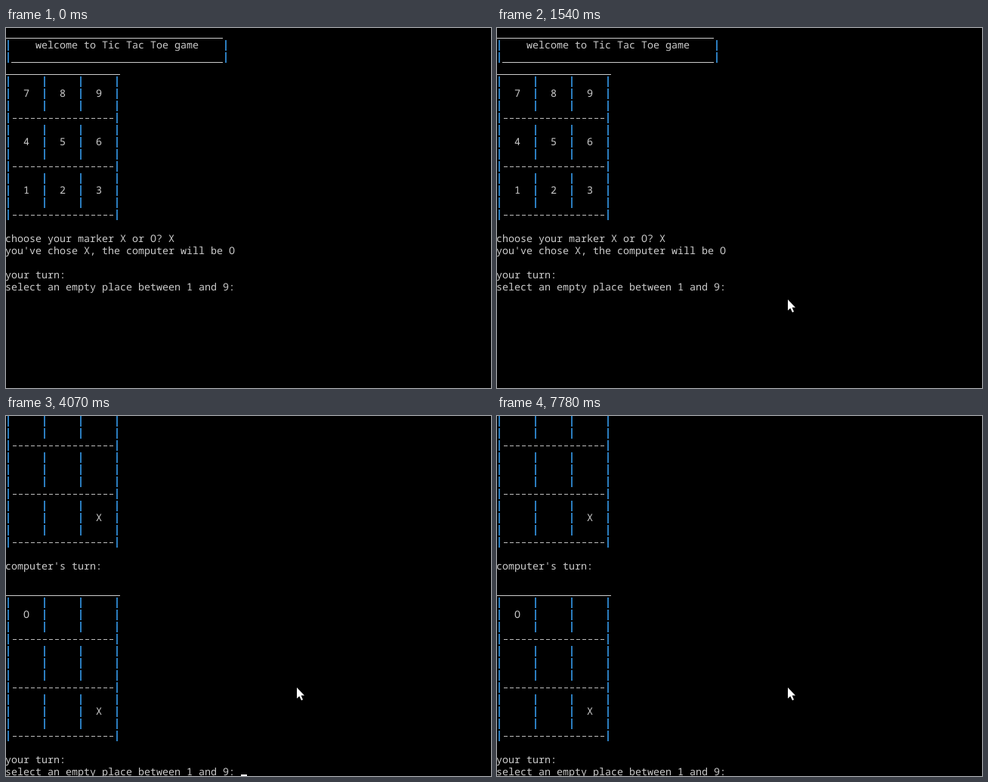
Recreate the animation shown at these times as an HTML page. Size 642 by 476 pixels, loop 8 s.

```html
<!DOCTYPE html>
<html lang="en">
<head>
<meta charset="utf-8">
<title>Tic Tac Toe console</title>
<style>
  html, body { margin: 0; width: 100%; height: 100%; overflow: hidden; background: #000; }
  svg { display: block; width: 642px; height: 476px; }
  text {
    font: 13.333px "Noto Sans Mono", "DejaVu Sans Mono", monospace;
    fill: #ccc;
    white-space: pre;
    text-rendering: geometricPrecision;
  }
  .pipe { stroke: #2b7cbd; stroke-width: 2; stroke-dasharray: 14 2; fill: none; }
  .dash { stroke: #bdbdbd; stroke-dasharray: 5 3; fill: none; }
  .rule { stroke: #ccc; fill: none; }

  /* 8 s loop: 80 ms is 1%, every change is a hard step */
  .start, .reply, .typed, .caret, .blink, .mouse { animation: 8s step-end infinite; }
  .start { animation-name: start; }
  .reply { animation-name: reply; }
  .typed { animation-name: typed; }
  .caret { animation-name: caret; }
  .blink { animation-name: blink; fill: #fff; }
  .mouse { animation-name: mouse; fill: #fff; }

  @keyframes start { 0% { visibility: visible; } 50.875%, 100% { visibility: hidden; } }
  @keyframes reply { 0% { visibility: hidden; } 50.875%, 100% { visibility: visible; } }
  @keyframes typed { 0%, 50.875%, 100% { opacity: 0; } 49.25% { opacity: 1; } }
  @keyframes caret {
    0% { transform: translate(311px, 346px); }
    49.25% { transform: translate(319px, 346px); }
    50.875%, 100% { transform: translate(311px, 474px); }
  }
  @keyframes blink {
    0%, 19.25%, 31.875%, 45.125%, 58.25%, 71.5%, 84.125%, 97.25%, 100% { opacity: 0; }
    12.5%, 25.875%, 38.5%, 49.25%, 64.875%, 78.125%, 91.5% { opacity: 1; }
  }
  @keyframes mouse {
    0%, 1.75% { transform: translate(700px, 500px); }
    0.875% { transform: translate(628px, 474px); }
    11.625% { transform: translate(608px, 359px); }
    12.5% { transform: translate(556px, 359px); }
    13.375% { transform: translate(502px, 359px); }
    14.25% { transform: translate(446px, 359px); }
    15.125%, 100% { transform: translate(385px, 359px); }
  }
</style>
</head>
<body>
<svg viewBox="0 0 642 476">
  <defs>
    <g id="board">
      <path class="rule" d="M0 -.5H151"/>
      <path class="pipe" d="M3 2v190M147 2v190M51 2v46M51 66v46M51 130v46M99 2v46M99 66v46M99 130v46"/>
      <path class="dash" d="M9 57.5h133M9 121.5h133M9 185.5h133"/>
    </g>
  </defs>

  <g class="start">
    <path class="rule" d="M0 13.5H287M7 45.5H287"/>
    <path class="pipe" d="M3 16v30M291 16v30"/>
    <text x="39" y="27">welcome to Tic Tac Toe game</text>
    <use href="#board" y="62"/>
    <text x="23" y="91">7     8     9</text>
    <text x="23" y="155">4     5     6</text>
    <text x="23" y="219">1     2     3</text>
    <text x="-1" y="283">choose your marker X or O? X</text>
    <text x="-1" y="299">you've chose X, the computer will be O</text>
    <text x="-1" y="331">your turn:</text>
    <text x="-1" y="347">select an empty place between 1 and 9:</text>
    <text class="typed" x="311" y="347">3</text>
  </g>

  <g class="reply">
    <use href="#board" y="-18"/>
    <text x="119" y="139">X</text>
    <text x="-1" y="203">computer's turn:</text>
    <use href="#board" y="238"/>
    <text x="23" y="267">O</text>
    <text x="119" y="395">X</text>
    <text x="-1" y="459">your turn:</text>
    <text x="-1" y="475">select an empty place between 1 and 9:</text>
  </g>

  <g class="caret"><rect class="blink" width="8" height="4"/></g>
  <path class="mouse" d="M0 0V14.5L3.3 11.5L6 17L8 16L5.6 10.5H10Z"/>
</svg>
</body>
</html>
```
